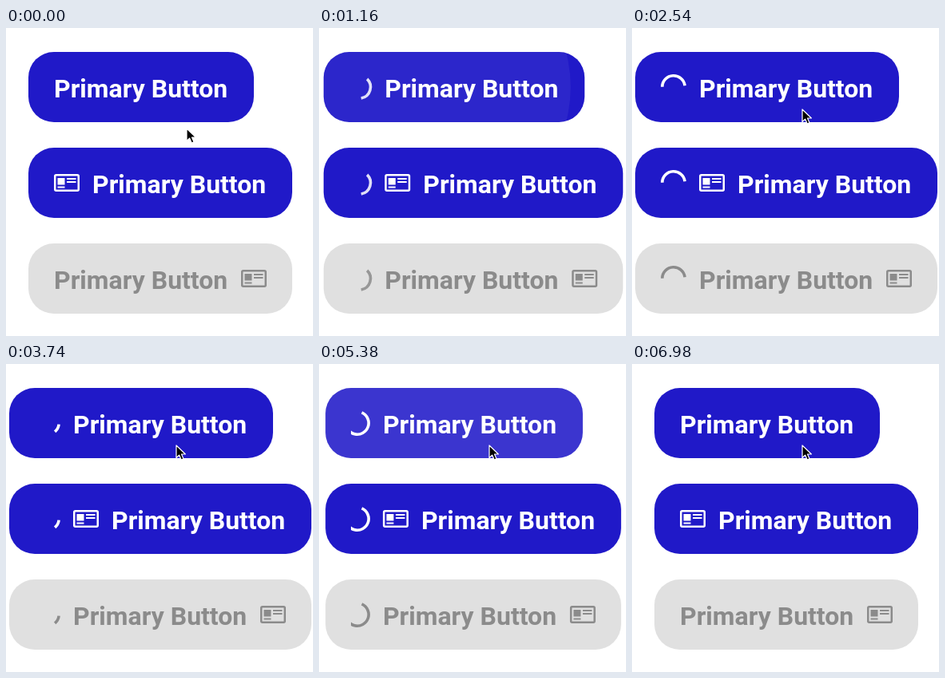
Write an HTML page that moves like this. It is 384 px wide and 386 px high and loops after 7.22 s.

```html
<!DOCTYPE html>
<html lang="en">
<head>
<meta charset="utf-8">
<title>Loading buttons</title>
<style>
  html, body { margin: 0; width: 100%; height: 100%; overflow: hidden; background: #fff; }
  svg { display: block; width: 100%; height: 100%; }
  text { font: 700 32px Roboto, Arial, sans-serif; }
</style>
</head>
<body>
<svg id="stage" viewBox="0 0 384 386"></svg>
<script>
const LOOP = 7220, SLOT = 48, TRANSITION = 300;
const OPEN_AT = 958, CLOSE_AT = 5315, SPIN_AT = 946;
const PRESSES = [832, 5200];
const BLUE = '#2019c8', TIP = { x: 213, y: 102 };
const stage = document.getElementById('stage');

function add(parent, tag, attrs = {}) {
  const node = document.createElementNS('http://www.w3.org/2000/svg', tag);
  set(node, attrs);
  parent.append(node);
  return node;
}

function set(node, attrs) {
  for (const key in attrs) node.setAttribute(key, attrs[key]);
}

const clamp = v => Math.min(1, Math.max(0, v));
const mix = (a, b, p) => a + (b - a) * p;

// cubic-bezier(.4, 0, .2, 1)
function standard(x) {
  let lo = 0, hi = 1;
  for (let i = 0; i < 22; i++) {
    const u = (lo + hi) / 2, v = 1 - u;
    if (1.2 * v * v * u + 0.6 * v * u * u + u ** 3 < x) lo = u; else hi = u;
  }
  return lo * lo * (3 - 2 * lo);
}

const ease = (t, start, length) => standard(clamp((t - start) / length));

function addIcon(parent, x, y, color) {
  const icon = add(parent, 'g', { transform: `translate(${x} ${y})`, fill: color });
  add(icon, 'rect', { x: 1.25, y: 1.25, width: 29.5, height: 19.5, rx: 1.5, fill: 'none', stroke: color, 'stroke-width': 2.5 });
  add(icon, 'path', { d: 'M4.5 5h9v8.5h-9zM16 5h11.5v2H16zM16 9h11.5v2H16zM4.5 15.5h9v2h-9z' });
}

function makeButton(y, width, fill, ink, icon) {
  const clip = add(add(stage, 'clipPath', { id: 'body' + y }), 'rect', { y, height: 88, rx: 32 });
  const slot = add(add(stage, 'clipPath', { id: 'slot' + y }), 'rect', { y, height: 88 });
  const body = add(stage, 'rect', { y, height: 88, rx: 32, fill });
  const ripple = add(add(stage, 'g', { 'clip-path': `url(#body${y})` }), 'circle', { fill: '#fff' });
  const arc = add(add(stage, 'g', { 'clip-path': `url(#slot${y})` }), 'path', { fill: 'none', stroke: ink, 'stroke-width': 3.6 });
  const content = add(stage, 'g');
  const label = add(content, 'text', { x: icon === 'left' ? 48 : 0, y: y + 56.8, fill: ink });
  label.textContent = 'Primary Button';
  if (icon) addIcon(content, icon === 'left' ? 0 : 234, y + 33, ink);
  return { y, width, clip, slot, body, ripple, arc, content };
}

const buttons = [
  makeButton(30, 282, BLUE, '#fff'),
  makeButton(150, 330, BLUE, '#fff', 'left'),
  makeButton(270, 330, '#e0e0e0', '#8b8b8b', 'right')
];
const cursor = add(stage, 'path', {
  d: 'M0 0V15.5L3.6 12.1L6.2 18L9 16.8L6.5 11H11.4Z',
  fill: '#000', stroke: '#fff', 'stroke-width': 1.2, 'stroke-linejoin': 'round'
});

// One end of the arc advances while the other rests; the whole turns steadily.
function spinnerAngles(elapsed) {
  const half = 666.5, step = Math.floor(elapsed / half);
  const sweep = 270 * standard(elapsed / half - step);
  const base = -95 + elapsed * 360 / 1568.24 + 135 * step;
  return step % 2 === 0
    ? [base, base + 10 + sweep]
    : [base - 135 + sweep, base + 145];
}

function arcPath(cx, cy, r, [from, to]) {
  const point = deg => {
    const a = deg * Math.PI / 180;
    return `${cx + r * Math.cos(a)} ${cy + r * Math.sin(a)}`;
  };
  return `M${point(from)}A${r} ${r} 0 ${to - from > 180 ? 1 : 0} 1 ${point(to)}`;
}

function drawRipple(circle, t, left, grow) {
  const press = PRESSES.find(p => t >= p && t < p + 410);
  if (press === undefined) return set(circle, { opacity: 0 });
  const p = ease(t, press, 225);
  const width = press === PRESSES[0] ? 282 : 330;
  const originX = TIP.x - (press === PRESSES[0] ? 28 : 4);
  const fade = clamp((t - press) / 60) * (1 - clamp((t - press - 250) / 150));
  set(circle, {
    cx: left + mix(originX, press === PRESSES[0] ? width / 2 : (282 + grow) / 2, p),
    cy: mix(TIP.y, 74, p),
    r: width * mix(0.3, 0.596, p),
    opacity: 0.12 * fade
  });
}

function draw(t) {
  const opening = t < CLOSE_AT;
  const open = opening ? ease(t, OPEN_AT, TRANSITION) : 1 - ease(t, CLOSE_AT, TRANSITION);
  const grow = SLOT * open, left = 28 - grow / 2;
  const angles = spinnerAngles(Math.max(0, t - SPIN_AT));

  for (const b of buttons) {
    const span = { x: left, width: b.width + grow };
    set(b.body, span);
    set(b.clip, span);
    set(b.slot, { x: left + 32, width: grow });
    set(b.content, { transform: `translate(${left + 32 + grow} 0)` });
    set(b.arc, {
      d: arcPath(28 + grow / 2, b.y + 44, 14.2, angles),
      opacity: opening ? open * open : Math.min(1, open * 1.2)
    });
  }
  drawRipple(buttons[0].ripple, t, left, grow);

  const move = ease(t, 0, 660);
  set(cursor, {
    transform: `translate(${mix(226, TIP.x, move)} ${mix(126, TIP.y, move)})`,
    visibility: t >= 1000 && t < 1300 ? 'hidden' : 'visible'
  });
}

const begin = performance.now();
function frame() {
  draw((performance.now() - begin) % LOOP);
  requestAnimationFrame(frame);
}
draw(0);
requestAnimationFrame(frame);
</script>
</body>
</html>
```
